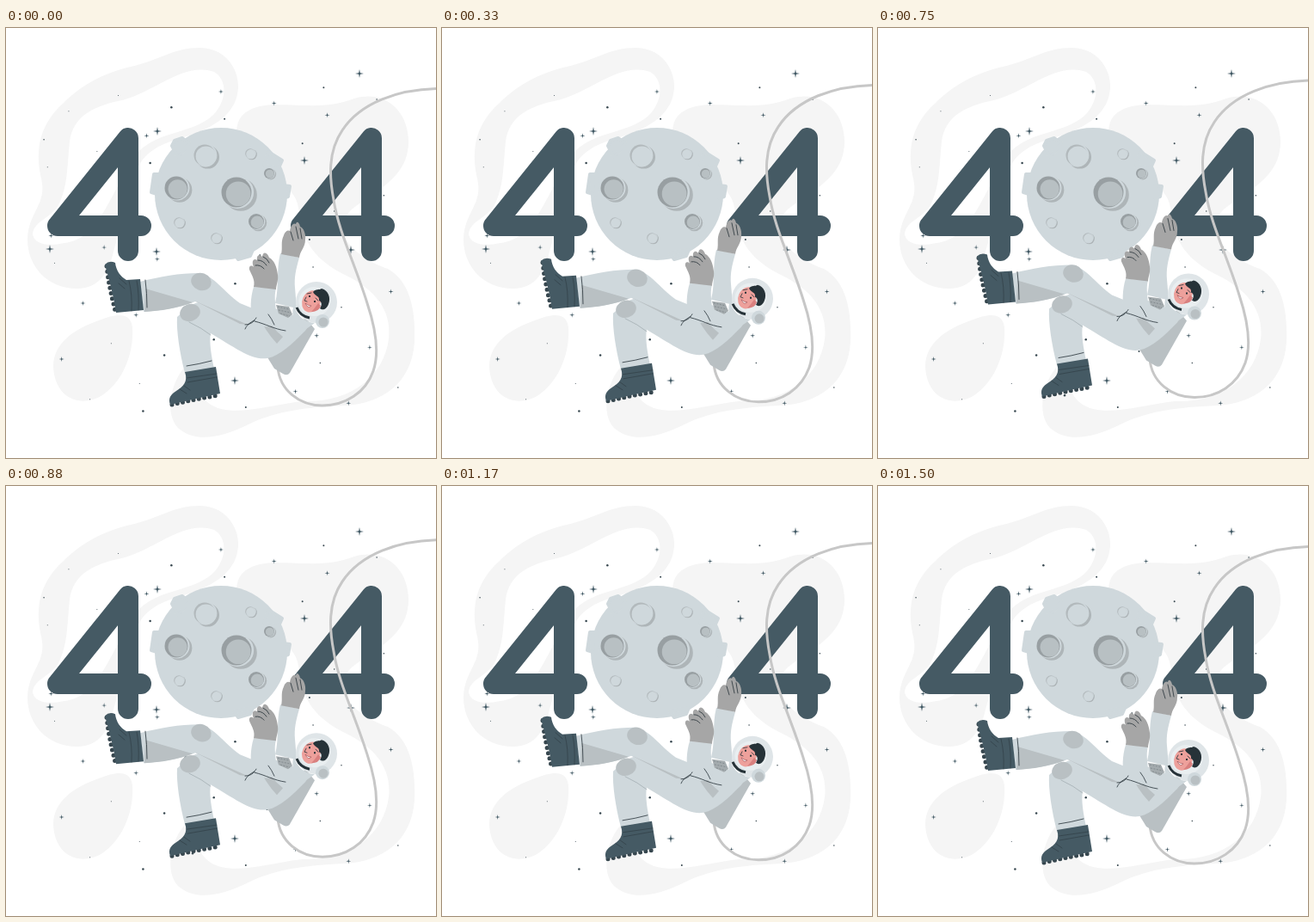
An HTML page that plays this animation: 500x500 px, repeating every 1.54 s.

```html
<!DOCTYPE html>
<html lang="en">
<head>
<meta charset="utf-8">
<title>404</title>
<style>
  html, body { margin: 0; width: 100%; height: 100%; overflow: hidden; background: #fff; }
  svg { display: block; width: 100%; height: 100%; }
  .line { fill: none; stroke: #263238; stroke-width: .8; stroke-linecap: round; stroke-linejoin: round; }
  .suit { fill: #cfd8dc; }
  .shade { fill: #b9c0c3; }
  .glove { fill: #a6a6a6; }
  .dark { fill: #263238; }
  .boot { fill: #455a64; }
  .tread { fill: none; stroke: #37474f; stroke-width: 5; stroke-linecap: round; stroke-dasharray: 0 6.4; }
  .four { fill: none; stroke: #455a64; stroke-width: 24; stroke-linecap: round; stroke-linejoin: round; }
</style>
</head>
<body>
<svg viewBox="0 0 500 500">
  <g fill="#f5f5f5">
    <path fill-rule="evenodd" d="M145 45C180 37 195 23 225 23C253 23 271 45 270 70C268 99 244 115 210 126C180 135 160 142 150 170L125 260C119 287 106 303 83 303C46 303 25 275 25 246C26 213 48 206 41 175C33 140 40 111 67 87C90 64 116 52 145 45ZM130 85C100 92 78 103 74 132C71 162 72 182 62 204C54 221 32 224 31 240C34 252 48 254 68 250C110 245 118 195 155 143C180 119 216 123 240 102C257 86 258 60 242 51C206 38 169 78 130 85Z"/>
    <path fill-rule="evenodd" d="M268 122C268 99 285 90 313 89C357 90 375 93 405 82C443 71 468 99 468 132C468 177 425 190 400 213C377 238 405 266 444 280C474 297 476 338 475 365C472 413 437 437 394 439C350 441 315 445 284 460C248 478 219 482 200 465C184 447 192 413 207 395L226 425C246 460 298 439 345 434C400 436 439 406 445 362C449 327 428 304 396 288C358 270 344 246 341 215C338 179 310 182 289 164C274 151 268 139 268 122Z"/>
    <path d="M55 394C55 365 82 349 108 340C130 331 145 331 147 348C149 378 136 411 112 427C88 442 57 432 55 394Z"/>
  </g>
  <g id="stars"></g>
  <path id="four" class="four" d="M60 230H157M60 230L142 128V259"/>
  <use href="#four" x="283"/>

  <g class="suit">
    <circle cx="250" cy="193" r="77"/>
    <path stroke="#cfd8dc" stroke-width="4" stroke-linejoin="round" d="M180 170L172 170L169 191L179 194ZM193 137L196 131L205 128L213 134L200 150ZM305 144L321 154L317 163L300 160ZM322 183L330 184L328 196L322 198ZM265 262L270 269L284 265L287 258Z"/>
  </g>
  <g id="craters"></g>

  <g id="astronaut">
    <path fill="none" stroke="#c7c7c7" stroke-width="3" d="M504 70.5C456 71 412 87 391 119C374 144 376 174 381 200C387 238 405 272 420 320C431 353 434 379 427 399C418 424 395 439 368 439C341 439 318 421 316 394"/>

    <!-- far arm and backpack -->
    <path class="suit" d="M319 262L341 267C337 281 335 290 336 302L338 326L313 320C318 300 314 281 319 262Z"/>
    <path class="glove" d="M320 263C322 255 319 249 323 241C325 235 329 235 330 236C331 230 334 226 337 228C338 224 341 226 342 231C346 232 349 240 348 246C348 255 342 259 341 267Z"/>
    <path class="line" d="M331 237L334 247M337 231L340 245M342 233L344 245"/>
    <path class="shade" d="M304 383L348 337L359 350L330 401Q327 405 322 402L312 396Z"/>

    <!-- legs and torso -->
    <path class="suit" d="M214 323C232 313 250 314 275 329L302 322L347 339Q354 345 348 352C333 367 319 381 304 384C286 387 267 372 238 355C236 366 239 382 242 396L208 401C202 378 198 352 199 336Z"/>
    <path class="suit" d="M156 295C179 289 202 285 224 285C243 288 252 306 272 320L304 333L282 345L220 318C201 326 181 328 160 330Z"/>
    <path class="shade" d="M162 303L217 319C199 326 180 329 161 330ZM219 317L281 345L272 344Z"/>
    <ellipse class="shade" cx="227" cy="295" rx="12" ry="10" transform="rotate(20 227 295)"/>
    <ellipse class="shade" cx="214" cy="331" rx="12" ry="10" transform="rotate(-18 214 331)"/>
    <path class="line" stroke-opacity=".25" d="M213 342Q228 349 238 357"/>
    <path class="line" d="M162 293Q164 308 164 325M210 393Q224 391 239 387"/>

    <!-- near arm and chest -->
    <path class="shade" d="M293 333L300 331Q307 347 322 359L315 367Q301 352 293 333Z"/>
    <path class="suit" d="M288 301L314 303C311 313 314 324 315 340C312 349 297 350 286 341C284 326 284 314 288 301Z"/>
    <path class="glove" d="M288 301C290 293 286 288 283 281C282 277 285 275 288 278C285 271 288 267 292 270C291 264 295 262 298 266C299 259 304 261 306 267C312 270 315 278 316 287C317 294 314 299 314 304Z"/>
    <path class="line" d="M290 276Q296 275 300 280M293 270Q299 270 303 276M299 266Q304 268 306 273"/>
    <path class="line" d="M278 350C281 342 290 341 291 337M278 345Q285 345 289 340M289 341C302 344 311 350 325 352M305 333Q309 338 312 345"/>
    <path fill="#a4abae" d="M314 322L329 324L333 333L328 337L317 332Z"/>
    <path fill="none" stroke="#858d91" stroke-dasharray="2 1.5" d="M316 324L329 327M317 328L331 331M319 332L330 335"/>

    <!-- head -->
    <circle cx="361" cy="319" r="24" fill="#dfe5e8"/>
    <path class="suit" d="M335 322C339 337 349 342 359 343L349 350C337 348 330 335 335 322Z"/>
    <ellipse cx="359" cy="318" rx="18.5" ry="17" fill="#e9eef0"/>
    <path fill="none" stroke="#263238" stroke-width="3" d="M338 325Q342 335 353 337"/>
    <ellipse cx="355" cy="318" rx="10.5" ry="13" transform="rotate(25 355 318)" fill="#eda09b"/>
    <path class="dark" d="M357 307C360 303 364 305 367 303C375 305 378 314 375 321C373 327 368 329 365 326C368 322 367 318 364 317C365 311 359 312 357 307Z"/>
    <path fill="#d9807f" d="M355 330Q364 330 366 323L363 320Q359 326 355 330Z"/>
    <path class="line" d="M350 309L355 308M360 314L363 317M349 313L347 317L350 318"/>
    <path class="dark" d="M352 311h2v2h-2zM358 317h2v2h-2z"/>
    <path fill="#fff" stroke="#a24e52" stroke-width=".7" d="M348 320Q351 323 355 323Q351 327 348 320Z"/>
    <circle cx="368" cy="341" r="8" class="suit"/>
    <circle cx="369" cy="342" r="5.5" class="shade"/>

    <!-- boots -->
    <path class="tread" d="M117 277L119 293L123 313L127 329"/>
    <path class="boot" d="M115 275Q120 270 127 273C128 282 133 289 140 293L156 292L160 328L128 331C125 311 120 293 115 275Z"/>
    <path class="line" stroke-opacity=".6" d="M143 294Q147 310 146 329M152 294Q155 310 154 328M132 291L140 298M131 297L138 303"/>
    <path class="tread" d="M193 438L220 432L248 427"/>
    <path class="boot" d="M208 400L244 394L249 425Q220 431 191 438C188 430 192 426 198 422C206 417 212 411 208 400Z"/>
    <path class="line" stroke-opacity=".6" d="M210 407L245 402M211 412L245 406M202 420L210 425M207 416L214 421"/>
  </g>
</svg>
<script>
  const byId = id => document.getElementById(id);

  const sparkle = (x, y, r) => {
    const k = r * .16;
    return `<path fill="#37505c" d="M${x} ${y - r}l${k} ${r - k}l${r - k} ${k}l${k - r} ${k}l${-k} ${r - k}l${-k} ${k - r}l${k - r} ${-k}l${r - k} ${-k}z"/>`;
  };
  const oval = (x, y, rx, ry, fill) =>
    `<ellipse cx="${x}" cy="${y}" rx="${rx}" ry="${ry}" fill="${fill}"/>`;

  // Bright stars stand at chosen places, the faint ones spread evenly by a low-discrepancy sequence.
  const bright = [[411, 53], [176, 120], [347, 154], [51, 257], [175, 260], [266, 410], [401, 258]];
  let sky = bright.map(([x, y]) => sparkle(x, y, 5)).join('');
  for (let i = 1; i <= 60; i++) {
    const x = 40 + 420 * (i * .7549 % 1), y = 50 + 400 * (i * .5698 % 1);
    sky += i % 3 ? oval(x, y, .5 + i % 4 * .25, .5 + i % 4 * .25, '#37474f') : sparkle(x, y, 3);
  }
  byId('stars').innerHTML = sky;

  // Rim on the lower right, inner wall on the upper left.
  const crater = (x, y, r, deep) => {
    const d = r * .28, floor = r * (deep ? .82 : .95);
    return oval(x + d, y + d * .6, r * 1.08, r * 1.08, '#aeb5b8') +
      oval(x + d * .25, y, r * 1.08, r * 1.08, '#cfd8dc') +
      oval(x, y, r, r, deep ? '#989fa2' : '#b2b9bc') +
      oval(x + r * .12, y + r * .1, floor, floor, deep ? '#b8c0c3' : '#cfd8dc');
  };
  byId('craters').innerHTML =
    crater(268, 191, 17.5, true) + crater(198, 186, 13.5, true) +
    crater(306, 169, 6, true) + crater(291, 225, 9, true) +
    crater(231, 148, 12.5) + crater(284, 146, 5.8) + crater(201, 226, 5.8) + crater(244, 244, 5.8);

  const LOOP = 1540, FLOAT = 1500, LIFT = 9.5;
  const astronaut = byId('astronaut');
  function draw() {
    const phase = Math.min(performance.now() % LOOP, FLOAT) / FLOAT;
    const y = -LIFT * (1 - Math.abs(1 - 2 * phase));
    astronaut.setAttribute('transform', `translate(0 ${y.toFixed(3)})`);
    requestAnimationFrame(draw);
  }
  draw();
</script>
</body>
</html>
```
